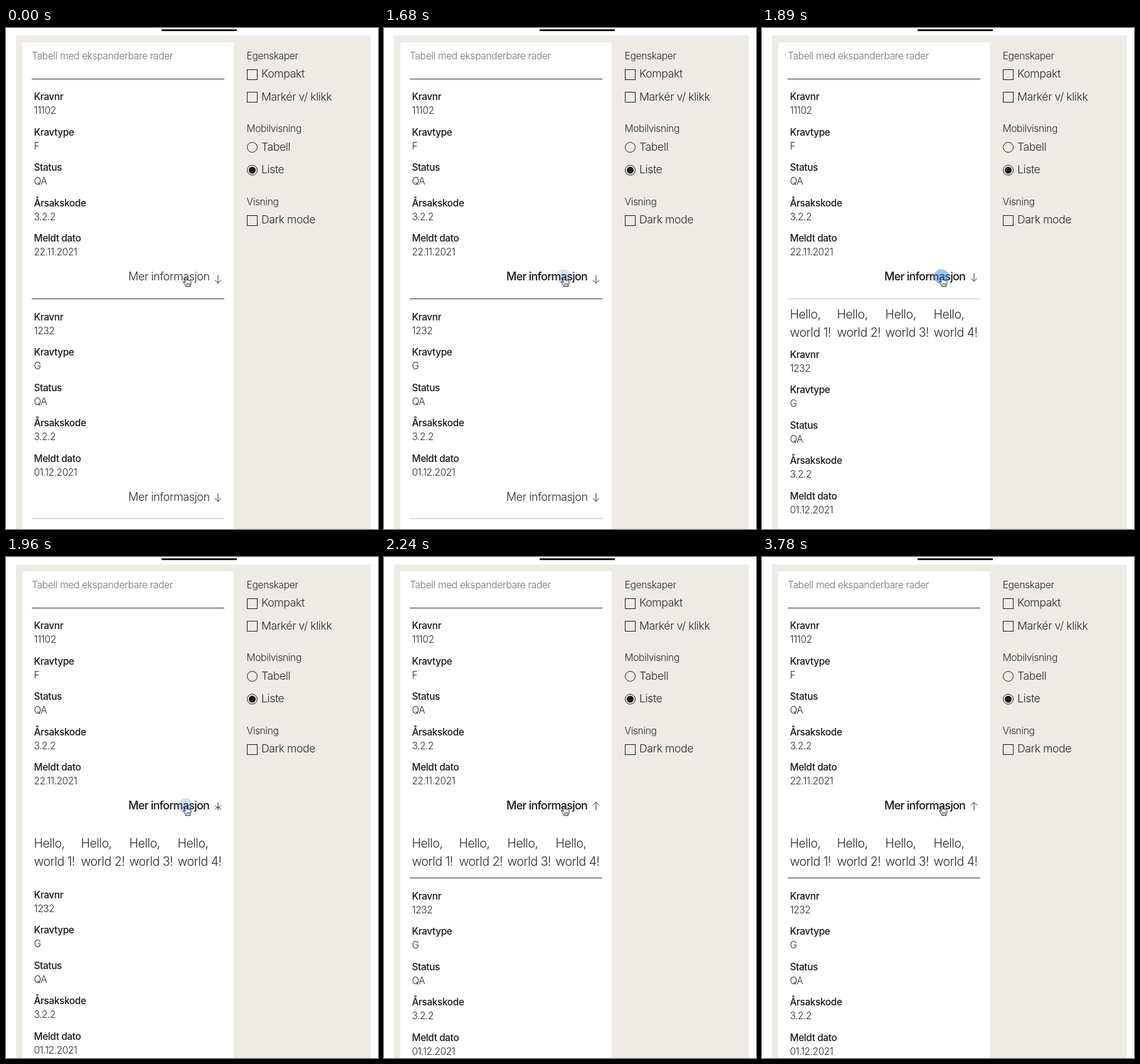
These frames come from a looping animation (593 by 800 pixels, 3.92 s). An HTML page:

```html
<!DOCTYPE html>
<html lang="no">
<head>
<meta charset="utf-8">
<title>Tabell med ekspanderbare rader</title>
<style>
  html, body { margin: 0; width: 100%; height: 100%; overflow: hidden; background: #fff; }
  svg { display: block; width: 100vw; height: 100vh; }
  text {
    font-family: Inter, "Open Sans", sans-serif;
    font-optical-sizing: none;
    font-weight: 300;
    letter-spacing: -.025em;
    fill: #2b2927;
  }
  .title { font-size: 15.66px; fill: #757371; }
  .head { font-size: 15.66px; }
  .option { font-size: 17.7px; }
  .label { font-size: 15.4px; font-weight: 500; fill: #1b1917; }
  .value { font-size: 15.4px; }
  .more { font-size: 18px; }
  .bold { font-weight: 500; letter-spacing: -.043em; fill: #1b1917; }
  .hello { font-size: 19.5px; }
  .box { fill: none; stroke: #1b1917; }
  .arrow { fill: none; stroke: #2b2927; }
  .rule { fill: #2b2927; }
  .pale { fill: #bdbbb9; }

  /* every step lasts 70 ms, 56 steps to the loop */
  .anim { animation: 3920ms step-end infinite; }
  .thin { animation-name: thin; }
  .bold { animation-name: bold; }
  .next { animation-name: push; }
  .panel { animation-name: panel; }
  .old-rule { animation-name: ruleOut; }
  .new-rule { animation-name: ruleIn; }
  .tap { animation-name: tap; }
  .icon { animation-name: lift; }
  .down { animation-name: down; }
  .up { animation-name: up; }

  @keyframes thin { 0% { opacity: 1 } 42.84%, 100% { opacity: 0 } }
  @keyframes bold { 0% { opacity: 0 } 42.84%, 100% { opacity: 1 } }
  @keyframes push {
    0% { transform: translateY(0) }
    48.2% { transform: translateY(60px) }
    49.98% { transform: translateY(78px) }
    51.77%, 100% { transform: translateY(80px) }
  }
  @keyframes panel { 0% { opacity: 0 } 48.2%, 100% { opacity: 1 } }
  @keyframes ruleOut { 0% { opacity: 1 } 48.2% { opacity: .3 } 49.98%, 100% { opacity: 0 } }
  @keyframes ruleIn {
    0% { opacity: 0 } 51.77% { opacity: .35 } 53.55% { opacity: .75 }
    55.34%, 100% { opacity: 1 }
  }
  @keyframes tap {
    0% { opacity: 0 } 42.84% { opacity: .4 } 44.63% { opacity: .8 } 46.41% { opacity: 1 }
    49.98% { opacity: .5 } 51.77% { opacity: .25 } 53.55% { opacity: .1 }
    55.34%, 100% { opacity: 0 }
  }
  @keyframes lift { 0% { transform: translateY(3px) } 48.2%, 100% { transform: translateY(0) } }
  @keyframes down {
    0% { opacity: 1; transform: translateY(0) }
    49.98% { opacity: 1; transform: translateY(-3px) }
    51.77%, 100% { opacity: 0; transform: translateY(-3px) }
  }
  @keyframes up {
    0% { opacity: 0; transform: translateY(7px) }
    49.98% { opacity: 1; transform: translateY(7px) }
    51.77% { opacity: 1; transform: translateY(2px) }
    53.55%, 100% { opacity: 1; transform: translateY(0) }
  }
</style>
</head>
<body>
<svg id="stage" viewBox="0 0 593 800" preserveAspectRatio="none"></svg>
<script>
  const text = (cls, x, y, str) => `<text class="${cls}" x="${x}" y="${y}">${str}</text>`;
  const rule = (y, cls = "rule") => `<rect class="${cls}" x="41" y="${y}" width="307" height="1"/>`;
  const check = y => `<rect class="box" x="384.5" y="${y}" width="16" height="16"/>`;
  const radio = y => `<circle class="box" cx="392.5" cy="${y}" r="8"/>`;
  const stem = "M338 391.5V404.5", downHead = "M333 399.5L338 404.5L343 399.5",
        upHead = "M333 396.5L338 391.5L343 396.5";

  const labels = ["Kravnr", "Kravtype", "Status", "Årsakskode", "Meldt dato"];
  const fields = values => labels.map((name, i) => {
    const y = 115 + i * 56.5;
    return text("label", 44.5, y, name) + text("value", 44.5, y + 22, values[i]);
  }).join("");

  const card = `
    <rect x="26" y="23" width="337" height="777" fill="#fff"/>
    ${text("title", 41, 49.5, "Tabell med ekspanderbare rader")}
    ${rule(81)}
    ${fields(["11102", "F", "QA", "3.2.2", "22.11.2021"])}
    ${text("more thin anim", 195, 403, "Mer informasjon")}
    ${text("more bold anim", 195, 403, "Mer informasjon")}
    <g class="arrow icon anim">
      <path d="${stem}"/>
      <path class="down anim" d="${downHead}"/>
      <path class="up anim" d="${upHead}"/>
    </g>
    ${rule(432, "rule old-rule anim")}
    <g class="panel anim">
      ${[44.5, 119.5, 196.5, 273.5].map((x, i) =>
        text("hello", x, 464, "Hello,") + text("hello", x, 493, `world ${i + 1}!`)).join("")}
    </g>
    ${rule(512, "rule new-rule anim")}
    <g class="next anim">
      <g transform="translate(0 351.5)">
        ${fields(["1232", "G", "QA", "3.2.2", "01.12.2021"])}
        ${text("more", 195, 403, "Mer informasjon")}
        <path class="arrow" d="${stem}${downHead}"/>
      </g>
      ${rule(783, "pale")}
    </g>`;

  const side = `
    ${text("head", 383.5, 49.5, "Egenskaper")}
    ${check(66.5)}${text("option", 407, 79, "Kompakt")}
    ${check(102.5)}${text("option", 407, 115.5, "Markér v/ klikk")}
    ${text("head", 383.5, 166, "Mobilvisning")}
    ${radio(190.5)}${text("option", 407, 195.5, "Tabell")}
    ${radio(227)}<circle cx="392.5" cy="227" r="5.5" fill="#1b1917"/>
    ${text("option", 407, 232, "Liste")}
    ${text("head", 383.5, 282.5, "Visning")}
    ${check(299.5)}${text("option", 407, 312, "Dark mode")}`;

  const hand = `
    <circle class="tap anim" cx="286" cy="397" r="11.8" fill="#3c8cf5" fill-opacity=".53"/>
    <g fill="#fff" stroke="#111" stroke-width="1" stroke-linejoin="round" stroke-linecap="round">
      <path d="M285.4 406.2V399.2Q285.6 397.8 286.8 397.9Q287.9 398 288 399.2V402.8
        Q288.3 401.8 289.4 402Q290.5 402.2 290.5 403.2Q291 402.4 292 402.8Q292.9 403.1 292.9 404
        Q293.5 403.4 294.4 403.9Q295 404.3 295 405.3V407.4Q294.9 409.2 293.7 410.6V412.8
        H286.8V411Q285 409.4 283.6 407.4Q281.8 405.3 282.8 404.4Q283.9 403.8 285.4 406.2Z"/>
      <path d="M288.1 407.5V410.5M290.3 407.5V410.5M292.5 407.5V410.5" stroke-width=".8"/>
    </g>`;

  document.getElementById("stage").innerHTML = `
    <rect x="248" y="2" width="120" height="3" fill="#1b1917"/>
    <rect x="16" y="12" width="565.5" height="788" fill="#eeebe6"/>
    ${card}${side}${hand}`;
</script>
</body>
</html>
```
